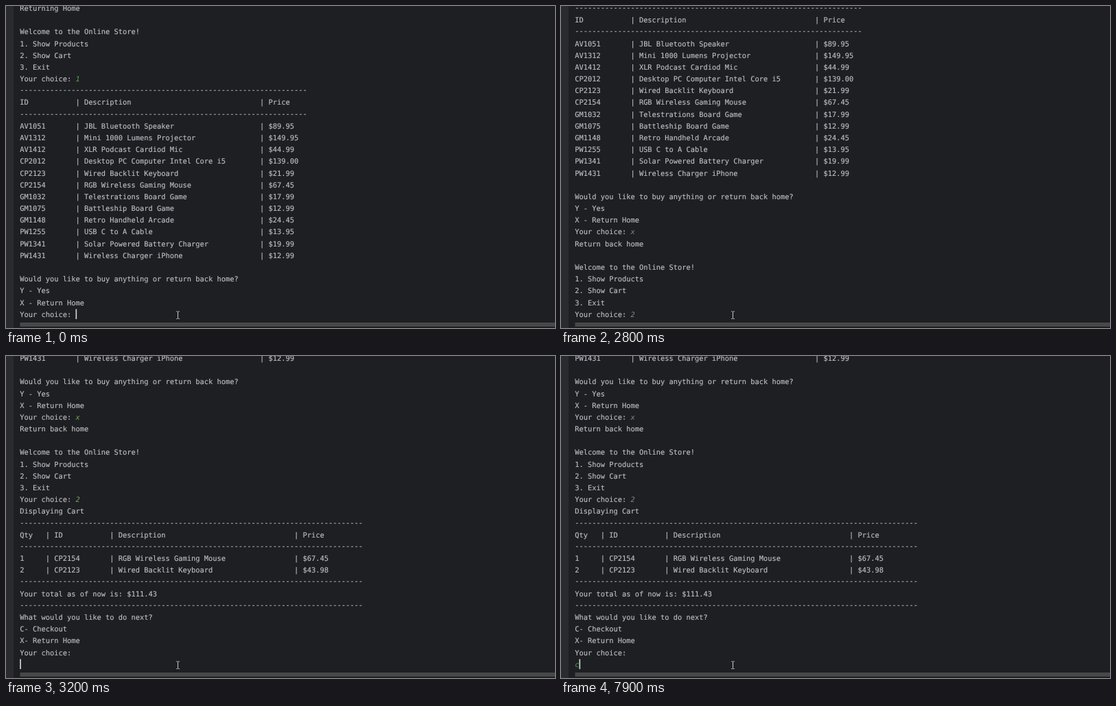
An HTML page that plays this animation: 800 px wide and 470 px high, repeating every 8000 ms.

```html
<!DOCTYPE html>
<html lang="en">
<head>
<meta charset="utf-8">
<title>Online store console</title>
<style>
  html, body { margin: 0; width: 100%; height: 100%; overflow: hidden; background: #1e1f22; }
  svg { display: block; }
  text {
    font: 10.385px "DejaVu Sans Mono", "Noto Sans Mono", monospace;
    fill: #bcbec4;
    stroke: #bcbec4;
    stroke-width: .15px;
    white-space: pre;
    text-rendering: geometricPrecision;
  }
  .echo { font-style: italic; fill: var(--ink); stroke: none; }
</style>
</head>
<body>
<svg width="800" height="470" viewBox="0 0 800 470">
  <rect width="800" height="470" fill="#1e1f22"/>
  <rect width="11" height="470" fill="#292b2e"/>
  <g id="log"></g>
  <rect x="20.5" y="462" width="780" height="6" fill="#474849"/>
  <rect id="caret" width="1.7" height="14.6" fill="#ced0d6"/>
  <path d="M248.3 445.9H250M251 445.9H252.8M250.5 446.4V455.9M248.3 456.5H250M251 456.5H252.8"
        stroke="#c9cacc" fill="none"/>
</svg>
<script>
const LOOP = 8000, LEFT = 20.2, CHAR = 6.252, PITCH = 17.18, BOTTOM = 453.7;
const RULE_LIFT = 1; // hyphens sit a little above their usual height
const PROMPT = 'Your choice: ';
const GREEN = '#5a9e5c', DULL = '#858a7a', SOFT = '#78a064';

const product = (id, name, price) => id.padEnd(13) + ('| ' + name).padEnd(43) + '| ' + price;
const cartRow = (qty, id, name, price) =>
  qty.padEnd(6) + ('| ' + id).padEnd(15) + ('| ' + name).padEnd(43) + '| ' + price;
const rule = n => '-'.repeat(n);
const menu = ['', 'Welcome to the Online Store!', '1. Show Products', '2. Show Cart', '3. Exit', PROMPT];

const lines = [
  'Returning Home', ...menu,
  rule(67), product('ID', 'Description', 'Price'), rule(67),
  product('AV1051', 'JBL Bluetooth Speaker', '$89.95'),
  product('AV1312', 'Mini 1000 Lumens Projector', '$149.95'),
  product('AV1412', 'XLR Podcast Cardiod Mic', '$44.99'),
  product('CP2012', 'Desktop PC Computer Intel Core i5', '$139.00'),
  product('CP2123', 'Wired Backlit Keyboard', '$21.99'),
  product('CP2154', 'RGB Wireless Gaming Mouse', '$67.45'),
  product('GM1032', 'Telestrations Board Game', '$17.99'),
  product('GM1075', 'Battleship Board Game', '$12.99'),
  product('GM1148', 'Retro Handheld Arcade', '$24.45'),
  product('PW1255', 'USB C to A Cable', '$13.95'),
  product('PW1341', 'Solar Powered Battery Charger', '$19.99'),
  product('PW1431', 'Wireless Charger iPhone', '$12.99'),
  '', 'Would you like to buy anything or return back home?', 'Y - Yes', 'X - Return Home', PROMPT,
  'Return back home', ...menu,
  'Displaying Cart', rule(80), cartRow('Qty', 'ID', 'Description', 'Price'), rule(80),
  cartRow('1', 'CP2154', 'RGB Wireless Gaming Mouse', '$67.45'),
  cartRow('2', 'CP2123', 'Wired Backlit Keyboard', '$43.98'),
  rule(80), 'Your total as of now is: $111.43', rule(80),
  'What would you like to do next?', 'C- Checkout', 'X- Return Home', PROMPT, ''
];

// Typed answers by line, in typing order
const answers = [[6, '1'], [26, 'x'], [33, '2'], [47, 'c']];

// time, last line, answers typed, caret column (-1 hidden), answer colour, scroll lag
const steps = [
  [0, 26, 1, 13, GREEN],
  [300, 26, 1, -1, GREEN],
  [800, 26, 1, 13, GREEN],
  [900, 26, 2, 14, GREEN],
  [1200, 27, 2, 0, GREEN],
  [1300, 33, 2, 13, DULL],
  [1800, 33, 2, -1, DULL],
  [2200, 33, 3, 14, DULL],
  [2800, 33, 3, -1, DULL],
  [2900, 34, 3, 0, SOFT],
  [3000, 37, 3, 0, SOFT],
  [3100, 47, 3, 0, SOFT, 6.9],
  [3200, 47, 3, 0, SOFT],
  [3900, 47, 3, -1, SOFT],
  [4300, 47, 3, 0, SOFT],
  [4900, 47, 3, -1, SOFT],
  [5400, 47, 3, 0, SOFT],
  [5900, 47, 3, -1, SOFT],
  [6400, 47, 3, 0, SOFT],
  [6900, 47, 3, -1, SOFT],
  [7100, 47, 3, -1, DULL],
  [7400, 47, 3, 0, DULL],
  [7600, 47, 4, 1, DULL]
];

const log = document.getElementById('log');
const caret = document.getElementById('caret');

function addText(row, col, content, className) {
  const el = document.createElementNS('http://www.w3.org/2000/svg', 'text');
  const lift = content.startsWith('--') ? RULE_LIFT : 0;
  el.setAttribute('x', LEFT + col * CHAR);
  el.setAttribute('y', row * PITCH - lift);
  el.setAttribute('class', className);
  el.textContent = content;
  return log.appendChild(el);
}

const rows = lines.map((line, i) => addText(i, 0, line, 'row'));
const echoes = answers.map(([row, key]) => addText(row, lines[row].length, key, 'echo'));
echoes[3].style.fill = '#4f9a58';

const show = (el, on) => { el.style.visibility = on ? 'visible' : 'hidden'; };
let current;

function render(step) {
  const [, last, typed, col, ink, lag = 0] = step;
  log.setAttribute('transform', `translate(0 ${BOTTOM - last * PITCH + lag})`);
  log.style.setProperty('--ink', ink);
  rows.forEach((el, i) => show(el, i < last || (i === last && lines[i] === PROMPT)));
  echoes.forEach((el, i) => show(el, i < typed));
  show(caret, col >= 0);
  caret.setAttribute('x', LEFT + col * CHAR);
  caret.setAttribute('y', 442.4 + lag);
}

const start = performance.now();
function tick() {
  const time = (performance.now() - start) % LOOP;
  const step = steps.findLast(s => s[0] <= time);
  if (step !== current) render(current = step);
  requestAnimationFrame(tick);
}
tick();
</script>
</body>
</html>
```
